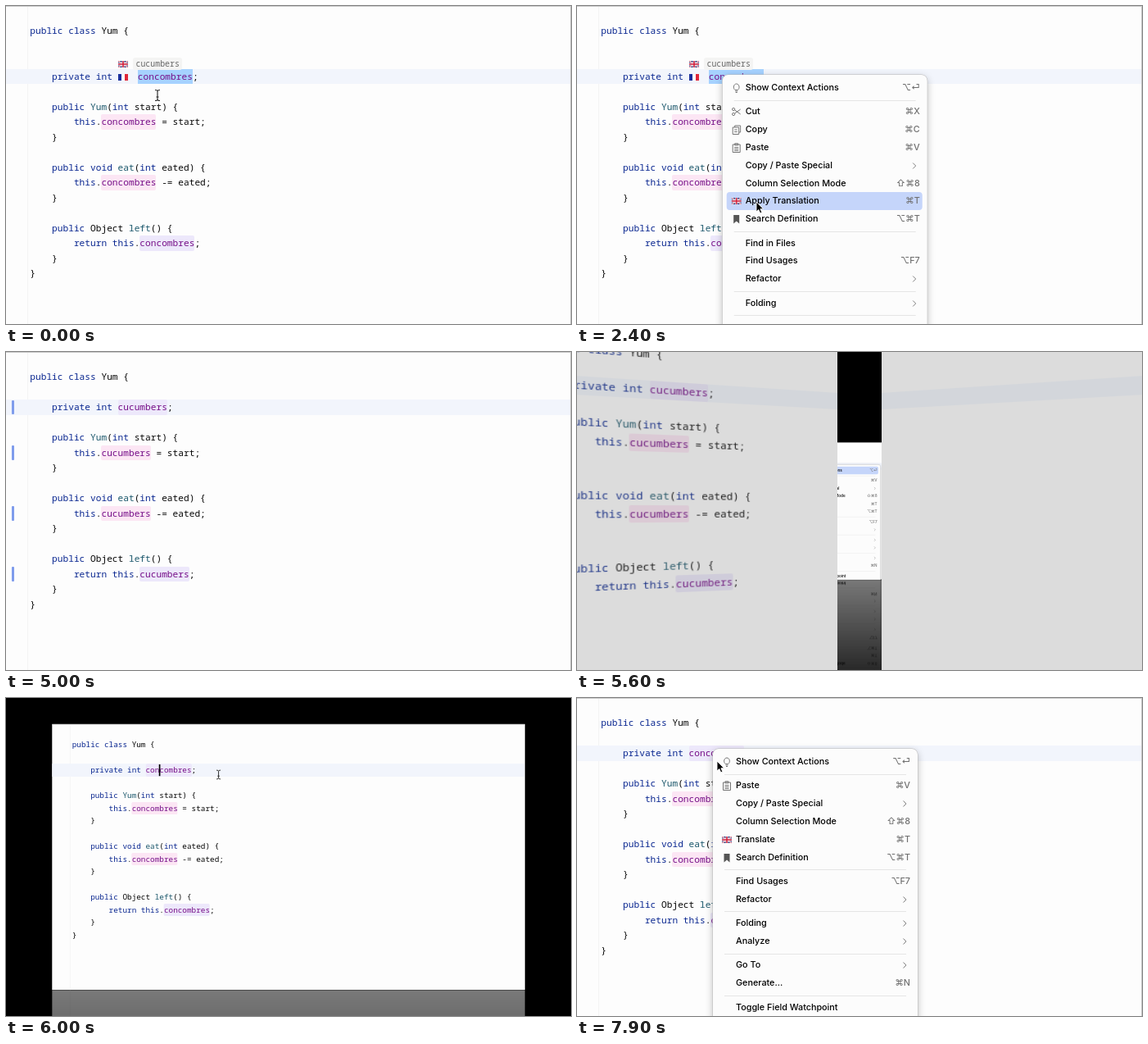
These frames come from a looping animation (690 px wide and 388 px high, 8 s). An HTML page:

```html
<!DOCTYPE html>
<html lang="en">
<head>
<meta charset="utf-8">
<title>Rename by translation</title>
<style>
html, body { margin: 0; width: 100%; height: 100%; overflow: hidden; background: #000; }
#stage { position: relative; width: 690px; height: 388px; overflow: hidden; background: #000; }
#stage div, #stage svg { position: absolute; }
#stage .scene, .editor { left: 0; top: 0; width: 690px; height: 388px; overflow: hidden; }
.editor {
  background: #fdfdfd; color: #080808;
  font: 500 11.18px/18.5px "Noto Sans Mono", "DejaVu Sans Mono", monospace;
}
.frame { inset: 0; box-shadow: inset -1px 1px #cbcbcb; }
.gutter { left: 26px; top: 1px; width: 1px; height: 387px; background: #f4f4f4; }
.line { left: 29.3px; height: 18.5px; white-space: pre; }
.current { left: 0; width: 689px; height: 18.5px; background: #f2f5fc; }
.changed { left: 6.5px; width: 3.5px; height: 17.5px; background: #7f9cec; border-radius: 1px; }
.line b { font-weight: 500; color: #0a2790; }
.line i { font-style: normal; color: #1c586c; }
.line u { display: inline-block; height: 18.5px; text-decoration: none; color: #760f88; border-radius: 2px; }
.write { background: #fce6f4; }
.read { background: #ede8fb; }
.selected .decl { background: #a6d2ff; border-radius: 0; }
.gap { display: inline-block; width: 24.3px; }
.hint {
  left: 155px; top: 62.5px; width: 60px; height: 15px; padding-left: 3.5px; box-sizing: border-box;
  background: #f4f4f3; border-radius: 3px; color: #686868; font-size: 9.9px; line-height: 15px;
}
.caret { left: 156px; top: 59px; width: 1.5px; height: 17px; background: #000; }
.menu {
  left: 0; top: 0; width: 249.5px; height: 420px; border-radius: 7px; background: #fcfcfc; color: #000;
  box-shadow: 0 0 0 .5px #bbb, 0 3px 10px rgba(0, 0, 0, .28);
  font: 500 10.8px/22px Inter, "Open Sans", "DejaVu Sans", sans-serif; white-space: nowrap;
}
.menu div { height: 22px; }
.menu .item { left: 0; width: 100%; }
.menu .label { left: 28px; top: 0; }
.menu .key { right: 8.5px; top: 0; color: #707070; }
.menu .sep { left: 14px; width: 222px; height: 1px; background: #e5e5e5; }
.menu .hover { left: 5px; width: 239px; background: #c5d5fa; border-radius: 4px; }
.icon { left: 11px; top: 5px; width: 12px; height: 12px; fill: none; stroke: #757575; }
#sceneB { -webkit-box-reflect: below 0 linear-gradient(transparent, rgba(0, 0, 0, .48)); }
#doors { inset: 0; perspective: 860px; }
.door { top: 0; width: 345px; height: 388px; overflow: hidden; }
.shade { inset: 0; background: #6e6e6e; }
</style>
</head>
<body>
<div id="stage"></div>
<script>
const PITCH = 18.5;
const FR = 'concombres', EN = 'cucumbers';

const svg = (body, attrs = '') => `<svg ${attrs} viewBox="0 0 12 12">${body}</svg>`;
const UK = `<path fill="#24387c" stroke="none" d="M0 2h12v8H0z"/>
  <path stroke="#fff" stroke-width="1.6" d="M0 2l12 8M12 2L0 10"/>
  <path stroke="#d0203c" stroke-width=".6" d="M0 2l12 8M12 2L0 10"/>
  <path stroke="#fff" stroke-width="2.8" d="M6 2v8M0 6h12"/>
  <path stroke="#d0203c" stroke-width="1.6" d="M6 2v8M0 6h12"/>`;
const FRANCE = `<path fill="#1a2f9c" d="M0 2h4v8H0z"/><path fill="#fff" d="M4 2h4v8H4z"/>
  <path fill="#e0283a" d="M8 2h4v8H8z"/>`;
const ICONS = {
  bulb: '<path d="M4.2 8.4C1.4 6.2 2.6 1 6 1s4.6 5.2 1.8 7.4zM4.5 10h3M5 11.5h2"/>',
  cut: '<circle cx="2.5" cy="3" r="1.6"/><circle cx="2.5" cy="9" r="1.6"/><path d="M4 4l7 5M4 8l7-5"/>',
  copy: '<path d="M4 3V1h7v8H9M1.5 3H9v8.5H1.5zM3.5 6H7M3.5 8.5H7"/>',
  paste: '<path d="M1.5 2h9v9.5h-9zM4 .8h4v2H4zM3.5 5.5h5M3.5 7.5h5M3.5 9.5h5"/>',
  uk: UK,
  mark: '<path fill="#555" stroke="none" d="M2.5 1h7v10.5L6 8.5l-3.5 3z"/>'
};

// Editor -------------------------------------------------------------
const source = w => [
  'public class Yum {', '',
  `    private int ${w};`, '',
  '    public Yum(int start) {', `        this.${w} = start;`, '    }', '',
  '    public void eat(int eated) {', `        this.${w} -= eated;`, '    }', '',
  '    public Object left() {', `        return this.${w};`, '    }',
  '}'
];

function editor(word, { inlay = false, changed = false } = {}) {
  const top = n => 21.25 + PITCH * (n + (inlay && n > 1 ? 1 : 0));
  const kind = n => n === 2 ? 'decl read' : n === 13 ? 'read' : 'write';
  const tokens = new RegExp(`\\b(?:(public|class|private|int|void|this|return)|(${word})|\\w+(?=\\())\\b`, 'g');
  const paint = (text, n) => text.replace(tokens, (m, key, field) =>
    key ? `<b>${m}</b>`
      : field ? `${inlay && n === 2 ? '<span class="gap"></span>' : ''}<u class="${kind(n)}">${m}</u>`
      : `<i>${m}</i>`);
  let html = `<div class="gutter"></div><div class="current" style="top:${top(2)}px"></div>`;
  source(word).forEach((text, n) => {
    html += `<div class="line" style="top:${top(n)}px">${paint(text, n)}</div>`;
  });
  if (changed) for (const n of [2, 5, 9, 13])
    html += `<div class="changed" style="top:${top(n) + .5}px"></div>`;
  if (inlay) {
    const flag = (body, y) => svg(body, `width="12" height="12" fill="none" style="left:137px;top:${y}px"`);
    html += flag(UK, 65) + flag(FRANCE, 80.5) + `<div class="hint">${EN}</div>`;
  }
  return `<div class="editor">${html}<div class="frame"></div></div>`;
}

// Context menu -------------------------------------------------------
const SHOW = ['Show Context Actions', '⌥⏎', 'bulb'];
const PASTE = ['Paste', '⌘V', 'paste'];
const SPECIAL = ['Copy / Paste Special', '>'];
const COLUMN = ['Column Selection Mode', '⇧⌘8'];
const SEARCH = ['Search Definition', '⌥⌘T', 'mark'];
const USAGES = ['Find Usages', '⌥F7'];
const REFACTOR = ['Refactor', '>'];
const FOLDING = ['Folding', '>'];
const MENU_A = [SHOW, 0, ['Cut', '⌘X', 'cut'], ['Copy', '⌘C', 'copy'], PASTE, SPECIAL, COLUMN,
  ['Apply Translation', '⌘T', 'uk'], SEARCH, 0, ['Find in Files', ''], USAGES, REFACTOR, 0, FOLDING, 0];
const MENU_B = [SHOW, 0, PASTE, SPECIAL, COLUMN, ['Translate', '⌘T', 'uk'], SEARCH, 0, USAGES, REFACTOR, 0,
  FOLDING, ['Analyze', '>'], 0, ['Go To', '>'], ['Generate...', '⌘N'], 0, ['Toggle Field Watchpoint', '']];
const CHEVRON = svg('<path d="M4.5 2.5L8 6 4.5 9.5"/>',
  'width="12" height="12" fill="none" stroke="#808080" style="right:1px;top:5px"');

function menu(items) {
  let y = 5, html = '';
  const tops = [];
  for (const item of items) {
    if (!item) {
      html += `<div class="sep" style="top:${y + 3.8}px"></div>`;
      y += 7.6;
      continue;
    }
    const [label, key, icon] = item;
    html += `<div class="item" style="top:${y}px">
      ${icon ? svg(ICONS[icon], 'class="icon"') : ''}<div class="label">${label}</div>
      <div class="key">${key === '>' ? CHEVRON : key}</div></div>`;
    tops.push(y);
    y += 21.8;
  }
  return { tops, html: `<div class="menu"><div class="hover"></div>${html}</div>` };
}

const CURSOR = `
  <svg class="beam" width="10" height="16" viewBox="-5 -8 10 16" fill="none" stroke="#222" stroke-width="1.1">
    <path d="M-3-6.5Q0-6.5 0-5Q0-6.5 3-6.5M0-5V5M-3 6.5Q0 6.5 0 5Q0 6.5 3 6.5M-1.5 2h3"/></svg>
  <svg class="arrow" width="14" height="18" viewBox="-2 -2 14 18">
    <path d="M0 0V12L2.8 9.5 4.7 13.8 6.8 12.9 4.9 8.7H8.6Z" stroke="#fff" stroke-width=".9"/></svg>`;

// Stage --------------------------------------------------------------
const stage = document.getElementById('stage');
const menuA = menu(MENU_A), menuB = menu(MENU_B);
const english = editor(EN, { changed: true });
stage.innerHTML = `
  <div class="scene" id="sceneB">${editor(FR)}<div class="caret"></div>${menuB.html}${CURSOR}</div>
  <div class="scene" id="sceneA">
    <div class="scene selected" id="before">${editor(FR, { inlay: true })}</div>
    <div class="scene" id="after">${english}</div>
    <div class="caret"></div>${menuA.html}${CURSOR}
  </div>
  <div id="doors">
    <div class="door" style="left:0;transform-origin:100% 50%">${english}<div class="shade"></div></div>
    <div class="door" style="left:345px;transform-origin:0 50%">
      <div style="left:-345px;top:0;width:690px;height:388px">${english}</div><div class="shade"></div></div>
  </div>`;

const $ = sel => stage.querySelector(sel);
const show = (el, on) => { el.style.display = on ? '' : 'none'; };
const within = (t, a, b) => t >= a && t < b;
const parts = id => ({
  root: $(id), caret: $(`${id} > .caret`), menu: $(`${id} > .menu`), hover: $(`${id} .hover`),
  beam: $(`${id} > .beam`), arrow: $(`${id} > .arrow`)
});
const A = parts('#sceneA'), B = parts('#sceneB');
const before = $('#before'), after = $('#after'), doors = $('#doors');
const [leftDoor, rightDoor] = doors.children;
const shades = doors.querySelectorAll('.shade');

const smooth = p => p * p * (3 - 2 * p);
// Value at time t in a table of [time, ...values] rows.
function track(t, rows, ease = p => p) {
  if (t <= rows[0][0]) return rows[0].slice(1);
  for (let i = 1; i < rows.length; i++) {
    const a = rows[i - 1], b = rows[i];
    if (t < b[0]) {
      const p = ease((t - a[0]) / (b[0] - a[0]));
      return a.slice(1).map((v, k) => v + (b[k + 1] - v) * p);
    }
  }
  return rows[rows.length - 1].slice(1);
}

const PATH_A = [[550, 185, 109], [750, 179, 91], [1700, 179, 91], [2400, 219, 239]];
const PATH_B = [[5800, 248.5, 74.5], [6200, 237.5, 73.5], [6500, 237.5, 73.5], [7200, 171, 77]];
const ZOOM = [[0, 1.73], [300, 1.15], [500, .763], [900, .122], [980, 0]];

function putCursor(s, [x, y], arrow, visible) {
  show(s.beam, visible && !arrow);
  show(s.arrow, visible && arrow);
  s.beam.style.transform = `translate(${x - 5}px,${y - 8}px)`;
  s.arrow.style.transform = `translate(${x - 2}px,${y - 2}px)`;
}

function putMenu(s, on, x, y, hoverTop) {
  show(s.menu, on);
  s.menu.style.transform = `translate(${x}px,${y}px)`;
  show(s.hover, hoverTop !== undefined);
  s.hover.style.top = `${hoverTop}px`;
}

function drawA(t) {
  const pos = track(t, PATH_A, smooth), open = within(t, 900, 2600);
  show(before, t < 2800);
  show(after, t >= 2800);
  after.classList.toggle('selected', t < 3500);
  show(A.caret, within(t, 2800, 3850) || within(t, 4400, 4950));
  const row = t > 1750 ? menuA.tops.find(y => within(pos[1] - 84, y, y + 21.8)) : undefined;
  putMenu(A, open, 177.7, 84, row);
  putCursor(A, pos, open, t < 3850);
}

function drawB(t) {
  const preview = t < 5680, open = t >= 7400;
  const [q] = track(t - 5300, ZOOM);
  B.root.style.transform = `scale(${1 / (1 + q * q)})`;
  show(B.caret, within(t, 5680, 6100) || within(t, 6650, 7200));
  if (preview) putMenu(B, true, 154, 63, menuB.tops[0]);
  else putMenu(B, open, 166, 62);
  putCursor(B, track(t, PATH_B, smooth), open, !preview);
}

function drawDoors(dt) {
  const k = dt / 300;
  const angle = .0715 * dt, z = 48 * k ** 1.87, slide = 25 * k ** 2.77;
  leftDoor.style.transform = `translate3d(${-slide}px,0,${z}px) rotateY(${angle}deg)`;
  rightDoor.style.transform = `translate3d(${slide}px,0,${z}px) rotateY(${-angle}deg)`;
  for (const s of shades) s.style.opacity = Math.min(1, .23 * k ** 1.78);
}

function render(t) {
  const opening = within(t, 5300, 6050);
  show(A.root, t < 5300);
  show(B.root, t >= 5300);
  show(doors, opening);
  if (t < 5300) drawA(t); else drawB(t);
  if (opening) drawDoors(t - 5300);
}

const start = performance.now();
function tick(now) {
  render(Math.max(0, now - start) % 8000);
  requestAnimationFrame(tick);
}
render(0);
requestAnimationFrame(tick);
</script>
</body>
</html>
```
